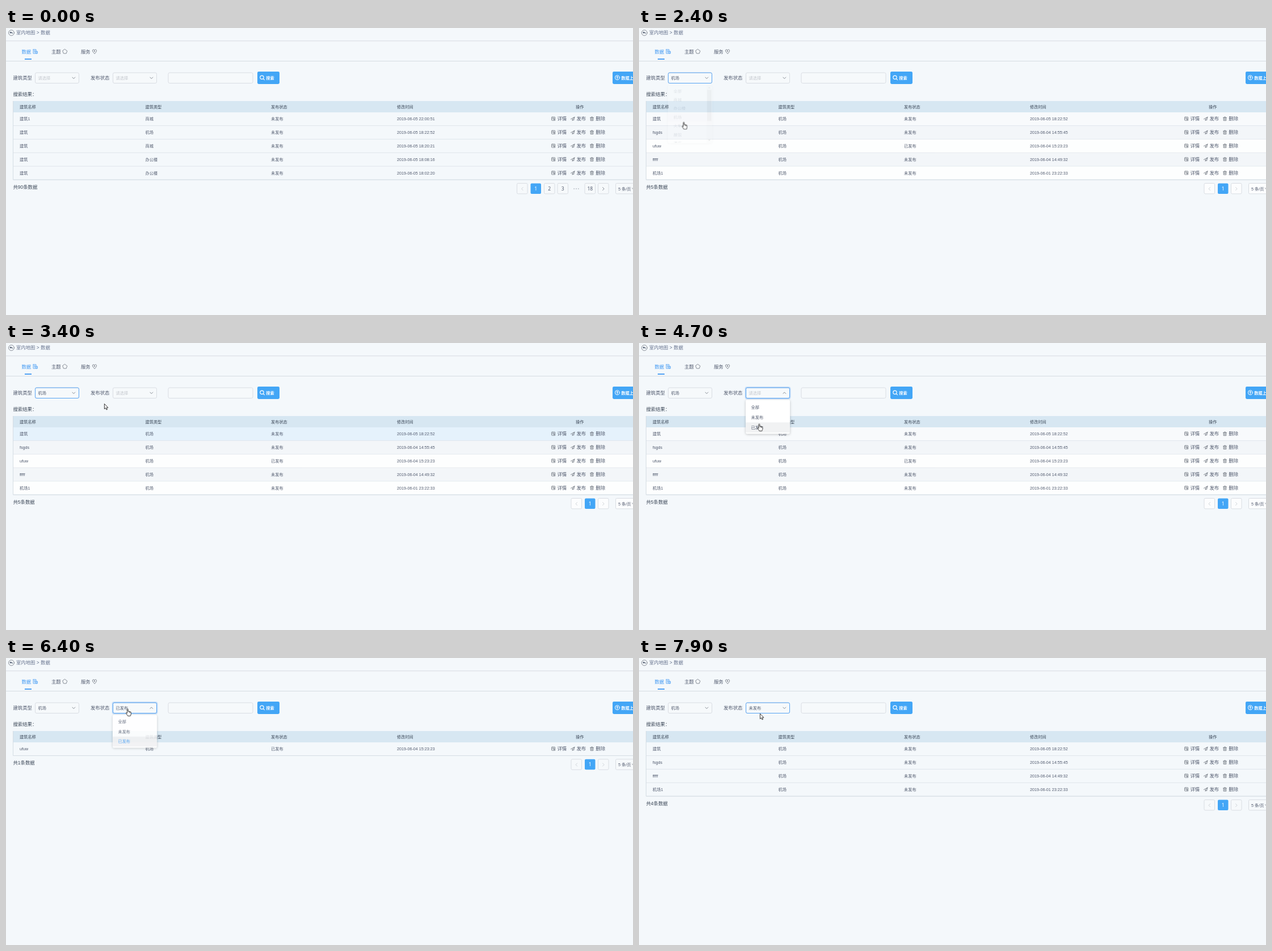
These frames come from a looping animation (1105 px wide and 507 px high, 8 s). An HTML page:

```html
<!DOCTYPE html>
<html lang="zh-CN">
<head>
<meta charset="utf-8">
<title>室内地图</title>
<style>
  html, body { margin: 0; width: 100%; height: 100%; overflow: hidden; background: #f4f8fb; }
  svg { display: block; }
  text { font-family: "Liberation Sans", "Noto Sans CJK SC", "Noto Sans CJK", sans-serif; fill: #515a6e; white-space: pre; }
  .head { fill: #3c4858; font-weight: 500; }
  .crumb { fill: #66738e; }
  .blue { fill: #3f98f3; }
  .hint { fill: #c3c7cd; }
  .white { fill: #fff; font-weight: 700; }
  .num { font-family: "Noto Sans", "Open Sans", "Noto Sans CJK SC", sans-serif; }
  .mid { text-anchor: middle; }
  .line { fill: none; stroke: #6b717c; stroke-width: .8; stroke-linecap: round; stroke-linejoin: round; }
  .box { fill: #f6f9fb; stroke: #d9dde3; stroke-width: 1; }
  .lit .box { fill: #fcfdfe; }
  .rule { stroke: #dfe5eb; stroke-width: 1; }
  .ring { fill: none; stroke: #57a3f3; stroke-width: 1; }
  .glow { fill: none; stroke: #2d8cf0; stroke-opacity: .22; stroke-width: 2; }
  .panel { fill: #fff; filter: drop-shadow(0 1px 2px rgba(0, 0, 0, .22)); }
  .menu { transform-origin: 0 99px; }
</style>
</head>
<body>
<script>
const LOOP = 8000, ROW = 23.9, TOP = 149, SMALL = 7.2, BASE = 8.4;

// --- drawing helpers -------------------------------------------------
const text = (x, mid, str, size = SMALL, cls = '') =>
  `<text x="${x}" y="${(mid + size * .37).toFixed(2)}" font-size="${size}" class="${cls}">${str}</text>`;
const rect = (x, y, w, h, attrs = '') => `<rect x="${x}" y="${y}" width="${w}" height="${h}" ${attrs}/>`;
const path = (d, attrs = 'class="line"') => `<path d="${d}" ${attrs}/>`;
const at = (x, y, body) => `<g transform="translate(${x} ${y})">${body}</g>`;
const group = (id, body, cls = '') => `<g id="${id}" class="${cls}">${body}</g>`;
const hline = (y, x = 0, color = '#d6dbe2') => path(`M${x} ${y}H1105`, `stroke="${color}" fill="none"`);

const icons = {
  detail: path('M1.4.5H5.8Q6.7.5 6.7 1.4V6.6H1.4Q.5 6.6.5 5.7V1.4Q.5.5 1.4.5M2 2.3H5.2M2 4H3.2M4.4 4V5.4H5.4V4Z'),
  plane: path('M.4 4.2L7 .5L5.6 6.3L3.2 4.9L7 .5M3.2 4.9V7L4.2 5.6'),
  trash: path('M.5 1.6H6.5M2.4 1.5V.4H4.6V1.5M1.2 1.7V6.9H5.8V1.7M2.8 3.2V5.4M4.2 3.2V5.4')
};

// --- table -----------------------------------------------------------
const actions = y => [['detail', 961, '详情', 971.5], ['plane', 995, '发布', 1005.5], ['trash', 1029, '删除', 1039.3]]
  .map(([icon, ix, label, tx]) => at(ix, y - 3.6, icons[icon]) + text(tx, y, label, BASE)).join('');

function row([name, type, state, time], i, lit) {
  const y = TOP + i * ROW, mid = y + 11.3;
  const fill = i === 0 ? '#f8fafc' : i % 2 ? '#f3f6f9' : '#fdfefe';
  return (lit ? rect(13, y, 1092, ROW, `fill="${fill}"`) : '') +
    (lit && i === 0 ? rect(13, y, 1092, ROW, 'id="hover" fill="#cfe8fd"') : '') +
    path(`M13 ${y + ROW - .4}H1105`, 'class="rule"') +
    text(24, mid, name) + text(245.5, mid, type) + text(467, mid, state) +
    text(689, mid, '2019-06-' + time) + actions(mid);
}

function pager(y, many) {
  const cell = (x, label, on) =>
    rect(x + .5, y - 9.5, 18.5, 18.5, on ? 'rx="2" fill="#43a6f6"' : 'rx="2" class="box"') +
    (label ? `<text x="${x + 9.8}" y="${y + 3}" font-size="8.6" class="num mid" ${on ? 'style="fill:#fff"' : ''}>${label}</text>` : '');
  const arrow = (x, dir, color) => cell(x) +
    path(`M${x + 9.8 - dir * 1.3} ${y - 2.4}l${dir * 2.6} 2.6l${-dir * 2.6} 2.6`, `class="line" style="stroke:${color}"`);
  const dots = [1001.2, 1005, 1008.8].map(x => `<circle cx="${x}" cy="${y}" r="1" fill="#bcc1c9"/>`).join('');
  const nav = many
    ? arrow(900, -1, '#c5c9d0') + cell(924, 1, true) + cell(948, 2) + cell(971.5, 3) + dots + cell(1019.5, 18) + arrow(1043, 1, '#666e7a')
    : arrow(995.5, -1, '#c5c9d0') + cell(1019.5, 1, true) + arrow(1043, 1, '#c5c9d0');
  return nav + rect(1074.5, y - 9.5, 50, 18.5, 'rx="2" class="box"') + text(1079, y, '5 条/页') +
    path(`M1103.5 ${y - 1}l2.5 2.4`);
}

function table(id, total, rows, lit) {
  const end = TOP + rows.length * ROW;
  return group(id, rows.map((r, i) => row(r, i, lit)).join('') +
    path(`M12.5 129V${end - .4}H1105`, 'fill="none" stroke="#d5dde4"') +
    text(12.5, end + 12, `共${total}条数据`, BASE, 'head') + pager(end + 15.4, total > 5), lit ? 'lit' : '');
}

const off = '未发布', on = '已发布', air = '机场';
const airport = [
  ['建筑', air, off, '05 18:22:52'], ['fsgds', air, off, '04 14:55:45'], ['ufuw', air, on, '04 15:23:23'],
  ['fffff', air, off, '04 14:49:32'], ['机场1', air, off, '01 23:22:33']
];
const everything = [
  ['建筑1', '商城', off, '05 22:00:51'], airport[0], ['建筑', '商城', off, '05 18:20:21'],
  ['建筑', '办公楼', off, '05 18:08:16'], ['建筑', '办公楼', off, '05 18:02:20']
];

// --- form ------------------------------------------------------------
const field = (x, w) => rect(x + .5, 79, w, 18.5, 'rx="2.4" class="box"');
function select(id, x, values) {
  const ring = rect(x + .5, 79, 77, 18.5, 'rx="2.4" class="ring"');
  const glow = rect(x - .5, 78, 79, 20.5, 'rx="3" class="glow"');
  return field(x, 77) + group(id + 'Focus', ring) + group(id + 'Glow', glow) +
    values.map((v, i) => group(id + i, text(x + 5.5, 88.2, v, SMALL, i ? '' : 'hint'))).join('') +
    group(id + 'Down', path(`M${x + 65.8} 87l2.5 2.5l2.5-2.5`)) +
    group(id + 'Up', path(`M${x + 65.8} 89.5l2.5-2.5l2.5 2.5`));
}
const items = (x, list) => list.map((s, i) => text(x, 113 + i * 17.95, s)).join('');
const bar = (id, x, w) => rect(x, 104.3, w, 17.9, `id="${id}" fill="#f1f2f3"`);

const typeMenu = group('typeMenu',
  rect(51, 100.5, 78, 120, 'rx="2.4" class="panel"') + bar('typeBar', 51, 68) +
  `<clipPath id="clip">${rect(51, 101, 78, 119)}</clipPath><g clip-path="url(#clip)">` +
  items(60.7, ['全部', '商城', '办公楼', air, '火车站', '展馆', '酒店']) + '</g>' +
  rect(119, 101, 9.5, 119, 'fill="#f1f1f1"') + rect(120, 111, 7.8, 64, 'fill="#c1c1c1"') +
  path('M121.8 107.5l2-2.4l2 2.4z', 'fill="#8a8a8a"') + path('M121.8 213.2l2 2.4l2-2.4z', 'fill="#505050"'), 'menu');
const stateMenu = group('stateMenu',
  rect(188, 100.5, 78, 60, 'rx="2.4" class="panel"') + bar('stateBar', 188, 78) +
  items(197.5, ['全部', off]) + group('plainOn', text(197.5, 148.9, on)) +
  group('pickedOn', text(197.5, 148.9, on, SMALL, 'blue')), 'menu');

// --- page ------------------------------------------------------------
const header =
  '<circle cx="9.5" cy="8.5" r="4.9" class="line"/>' +
  path('M8.6 5.9L6.4 8L8.6 10.1V8.8Q11 8.6 12.3 10.4Q11.8 7.2 8.6 7.2Z', 'fill="#4f5a6e"') +
  text(18, 8.3, '室内地图 &gt; 数据', BASE, 'crumb') + hline(22.8) + hline(58.5) +
  text(27.5, 41.7, '数据', BASE, 'blue') + text(80, 41.7, '主题', BASE) + text(132, 41.7, '服务', BASE) +
  rect(33, 54, 12, 1.8, 'fill="#3f98f3"') +
  path('M48 38H53V40M48 38V45H51M49.5 40H51.5M49.5 42H51M52 41.2H55.4V45H52ZM53.7 41.2V45', 'class="line" style="stroke:#3f98f3"') +
  path('M103.8 37.6L107.8 40.5L106.2 45H101.4L99.8 40.5Z') +
  path('M156 45.3L152.6 41.4Q151.6 38.4 154 38Q155.4 38 156 39.4Q156.8 38 158.2 38Q160.6 38.6 159.4 41.4ZM156 39.4L155 41.4H157');

const form =
  text(12.5, 87.5, '建筑类型', BASE) + text(149, 87.5, '发布状态', BASE) +
  select('type', 51, ['请选择', air]) + select('state', 188, ['请选择', on, off]) + field(285.5, 149) +
  rect(443, 77, 39, 22, 'rx="2.4" fill="#43a6f6"') +
  '<g fill="none" stroke="#fff" stroke-width="1.2" stroke-linecap="round"><circle cx="451" cy="87.3" r="3.1"/><path d="M453.4 89.7l2 2"/></g>' +
  text(458.3, 88.4, '搜索', SMALL, 'white') +
  rect(1069, 77, 60, 22, 'rx="2.4" fill="#43a6f6"') +
  '<g fill="none" stroke="#fff" stroke-linecap="round"><circle cx="1077.4" cy="87.6" r="4"/><path d="M1077.4 90V85.4M1075.6 87.1l1.8-1.8l1.8 1.8"/></g>' +
  text(1084.3, 88.4, '数据上传', SMALL, 'white') +
  text(12.5, 117, '搜索结果：', BASE, 'head') +
  rect(12, 129, 1093, 20, 'fill="#d7e7f2"') +
  [[24, '建筑名称'], [245.5, '建筑类型'], [467, '发布状态'], [689, '修改时间'], [1004, '操作']]
    .map(([x, s]) => text(x, 139.3, s, SMALL, 'head')).join('');

const ink = 'fill="#fff" stroke="#222" stroke-width=".9" stroke-linejoin="round"';
const cursor = group('cursor',
  group('arrow', path('M.4.4V9.6L2.5 7.7L4 11L5.5 10.3L4.1 7.2H6.9Z', ink)) +
  group('hand', path('M2.6 8.6V1.4Q3.4-.2 4.2 1.4V5.2Q5.2 4.4 5.9 5.5Q6.9 4.9 7.5 6Q9 5.5 9.3 7V10Q9 12 8.2 13.4H3.6Q2.6 11.4.6 8.8Q.4 7.2 1.6 7.7ZM5.9 5.5V7.4M7.5 6V7.6', ink)));

document.body.innerHTML = `<svg width="1105" height="507" viewBox="0 0 1105 507">${header}${form}${
  table('all', 90, everything) + table('air', 5, airport, true) + table('live', 1, [airport[2]]) +
  table('draft', 4, airport.filter(r => r[2] === off))}${typeMenu}${stateMenu}${cursor}</svg>`;

// --- motion: values hold from the given ms until the next entry -------
let css = '';
const tracks = {};
function track(id, prop, values) {
  const name = `${id}-${prop}`;
  const frames = Object.entries(values).map(([t, v]) => `${t / LOOP * 100}%{${prop}:${v}}`).join('');
  css += `@keyframes ${name}{${frames}}`;
  (tracks[id] ??= []).push(`${name} ${LOOP}ms step-end infinite`);
}
const show = (id, ...spans) => {
  const values = { 0: 0 };
  for (const [from, to] of spans) {
    values[from] = 1;
    if (to < LOOP) values[to] = 0;
  }
  track(id, 'opacity', values);
};
// A menu drops open over 300 ms and fades the same way when closed.
function menu(id, spans) {
  const alpha = { 0: 0 }, scale = { 0: 'scaleY(.8)' };
  for (const [from, to] of spans) {
    [.35, .86, 1].forEach((a, i) => {
      alpha[from + i * 100] = a;
      scale[from + i * 100] = `scaleY(${[.88, .97, 1][i]})`;
    });
    [.6, .15, 0].forEach((a, i) => {
      alpha[to + i * 100] = a;
      scale[to + i * 100] = `scaleY(${[.97, .86, .8][i]})`;
    });
  }
  track(id, 'opacity', alpha);
  track(id, 'transform', scale);
}

show('all', [0, 2400]);
show('air', [2400, 5200]);
show('live', [5200, 7600]);
show('draft', [7600, LOOP]);
track('hover', 'opacity', { 0: 0, 2500: .5, 2600: 1, 3400: .45, 3500: 0 });

show('type0', [0, 2300]);
show('type1', [2300, LOOP]);
show('state0', [0, 5100]);
show('state1', [5100, 7500]);
show('state2', [7500, LOOP]);
show('typeFocus', [1000, 3800]);
show('stateFocus', [3600, LOOP]);

const typeOpen = [[1400, 2300]], stateOpen = [[3900, 5100], [6300, 7500]];
for (const [id, open] of [['type', typeOpen], ['state', stateOpen]]) {
  menu(id + 'Menu', open);
  show(id + 'Up', ...open);
  show(id + 'Glow', ...open);
  show(id + 'Down', ...[...open, [LOOP]].map(([from], i) => [i ? open[i - 1][1] : 0, from]));
}
show('plainOn', [0, 5200]);
show('pickedOn', [5200, LOOP]);

const line = n => `translateY(${n * 17.95}px)`;
track('typeBar', 'opacity', { 0: 0, 1700: 1 });
track('typeBar', 'transform', { 0: line(0), 1800: line(1), 1900: line(2), 2000: line(3) });
track('stateBar', 'opacity', { 0: 0, 4400: 1 });
track('stateBar', 'transform', { 0: line(0), 4500: line(1), 4600: line(2), 6600: line(0), 6800: line(1) });

const move = (x, y) => `translate(${x}px,${y}px)`;
show('cursor', [500, LOOP]);
show('hand', [1000, 3300], [3600, 7700]);
show('arrow', [500, 1000], [3300, 3600], [7700, LOOP]);
track('cursor', 'transform', {
  0: move(739, 86), 600: move(520, 84), 700: move(300, 82), 800: move(130, 84), 900: move(14, 88),
  1000: move(52, 92), 1100: move(79, 93), 1300: move(80, 96), 1500: move(80, 100), 1700: move(79, 112),
  1800: move(77, 131), 1900: move(76, 152), 2000: move(75.5, 165.5),
  3300: move(125, 142), 3400: move(173, 107), 3500: move(198, 97), 3600: move(206, 92), 3700: move(207.5, 90),
  4400: move(208, 101), 4500: move(209, 119), 4600: move(209, 134), 4700: move(208.5, 142),
  5700: move(209, 128), 5800: move(210, 109), 5900: move(211, 94), 6000: move(211, 89),
  6600: move(211, 101), 6700: move(210, 114), 6800: move(210, 122), 6900: move(209.5, 125),
  7700: move(211, 116), 7800: move(212.5, 103), 7900: move(213, 98)
});

for (const id in tracks) css += `#${id}{animation:${tracks[id].join()}}`;
document.head.appendChild(document.createElement('style')).textContent = css;
</script>
</body>
</html>
```
